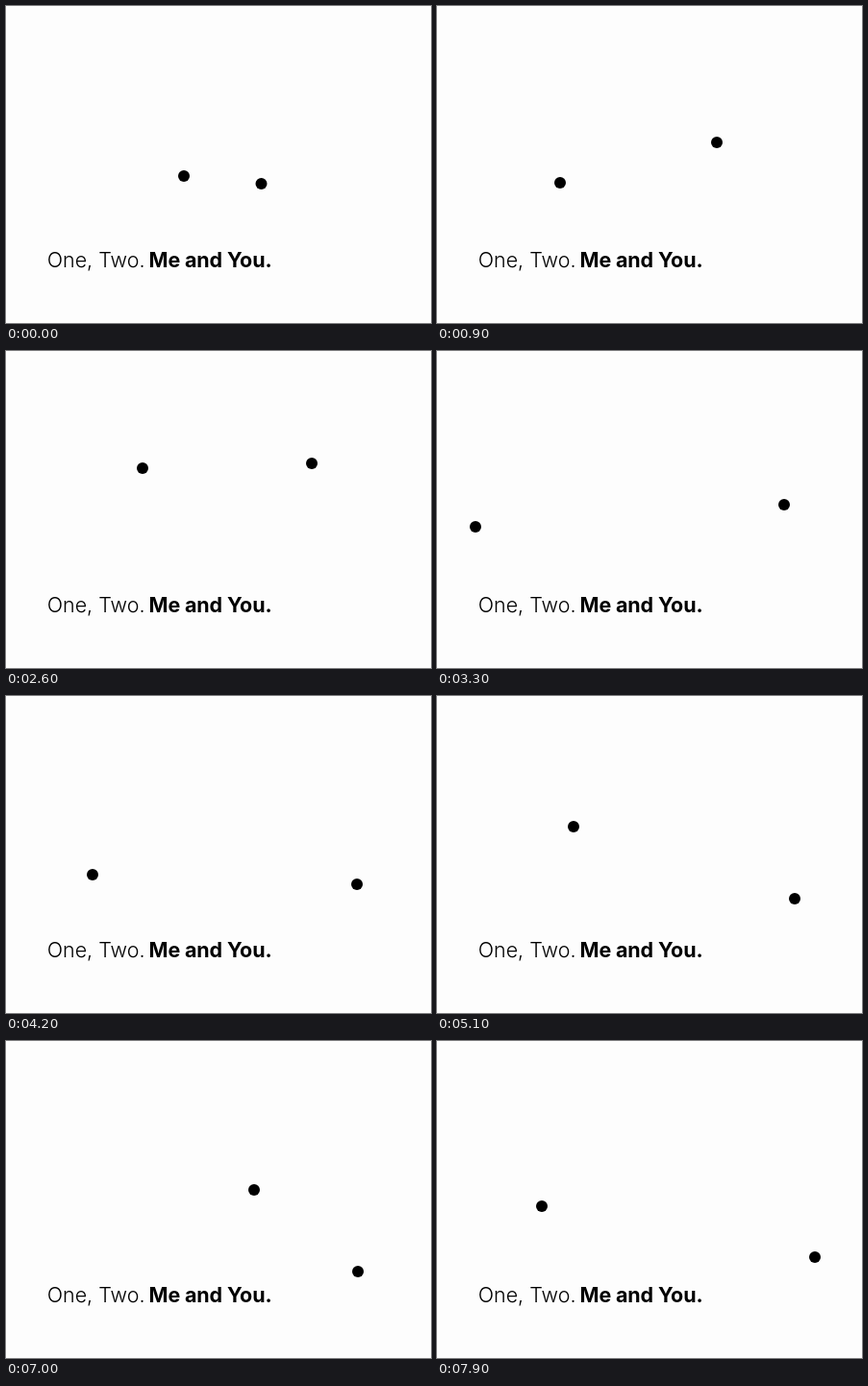
Write an HTML page that moves like this. It is 442 px wide and 330 px high and loops after 8000 ms.

```html
<!DOCTYPE html>
<html lang="en">
<head>
<meta charset="utf-8">
<title>One, Two. Me and You.</title>
<style>
html, body { margin: 0; width: 100%; height: 100%; overflow: hidden; background: #fdfdfd; }
svg { display: block; width: 442px; height: 330px; }
text { font: 300 21.5px Inter, Lato, sans-serif; fill: #000; }
.bold { font-weight: 700; letter-spacing: -.15px; }
</style>
</head>
<body>
<svg viewBox="0 0 442 330">
  <text x="42.7" y="272">One, Two.</text>
  <text class="bold" x="148.5" y="272">Me and You.</text>
  <circle id="me" r="6"/>
  <circle id="you" r="6"/>
</svg>
<script>
const LOOP = 8000, STEP = 100;

// Both dots pass a key point at each of these times
const times = [0, 900, 1900, 2600, 3300, 4200, 5100, 6000, 6500, 7000, 7900];
const paths = {
  me: {
    cx: [185, 128, 98, 142, 40, 90, 142, 266, 286, 258, 109],
    cy: [177, 184, 161, 122, 183, 186, 136, 150, 178, 155, 172]
  },
  you: {
    cx: [265.5, 291, 299.5, 318, 361, 365, 372, 367, 392, 366, 393],
    cy: [185, 142, 118, 117, 160, 196, 211, 242, 260, 240, 225]
  }
};

// Slope at a key point, from its neighbours
function slope(values, i) {
  const a = Math.max(i - 1, 0), b = Math.min(i + 1, times.length - 1);
  return (values[b] - values[a]) / (times[b] - times[a]);
}

// Cubic Hermite curve through the key points
function at(values, time) {
  const i = Math.max(times.findIndex(t => t >= time) - 1, 0);
  const span = times[i + 1] - times[i];
  const u = (time - times[i]) / span, v = 1 - u;
  return v * v * (1 + 2 * u) * values[i] + u * u * (3 - 2 * u) * values[i + 1]
    + span * u * v * (v * slope(values, i) - u * slope(values, i + 1));
}

function draw(now) {
  const time = Math.floor((now % LOOP) / STEP) * STEP;
  for (const id in paths) {
    const dot = document.getElementById(id);
    for (const axis in paths[id]) dot.setAttribute(axis, at(paths[id][axis], time));
  }
}

const start = performance.now();
function tick() {
  draw(performance.now() - start);
  requestAnimationFrame(tick);
}
tick();
</script>
</body>
</html>
```
